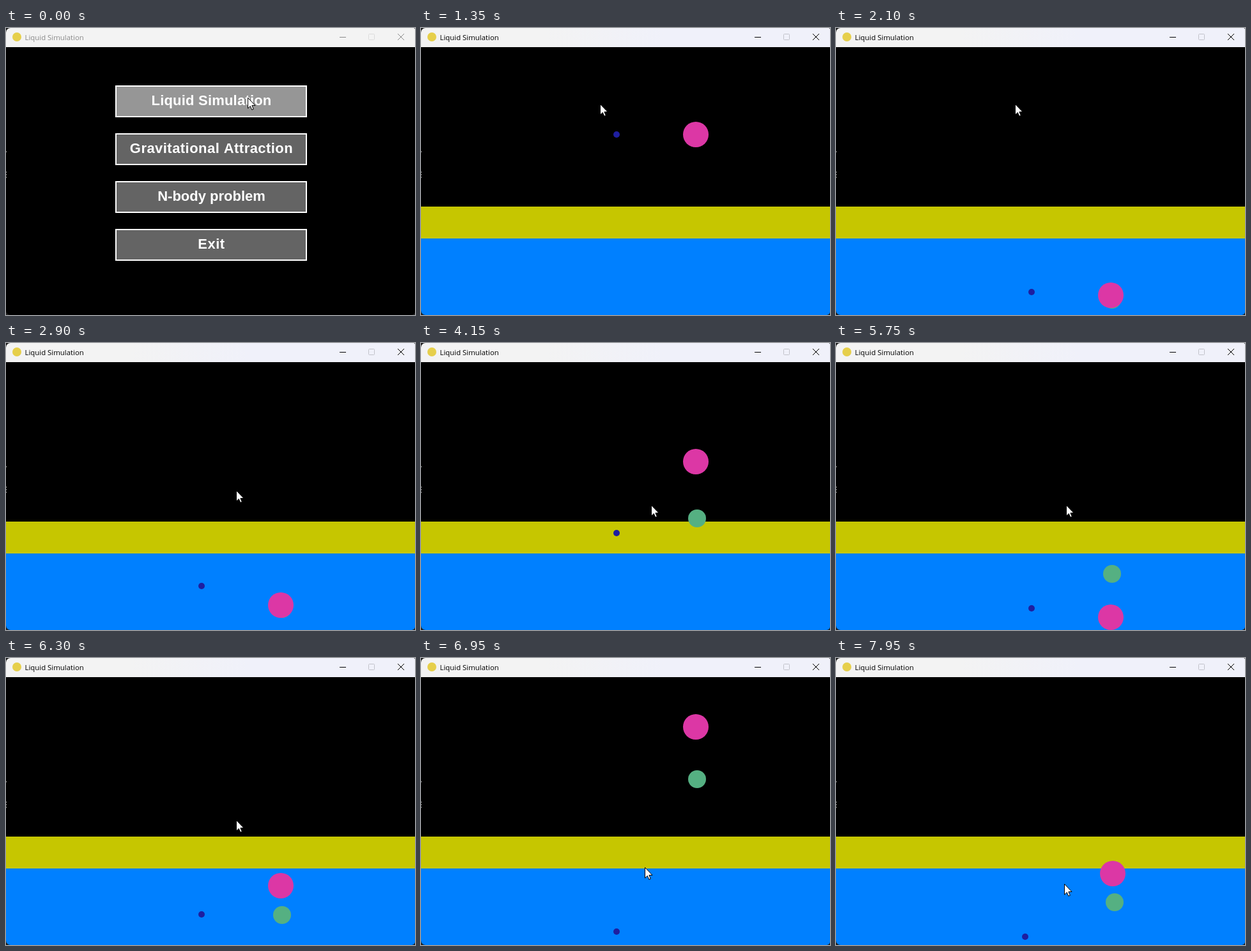
An HTML page with a canvas for the animation above (8 s loop, 640 by 450 pixels).

```html
<!DOCTYPE html>
<html lang="en">
<head>
<meta charset="utf-8">
<title>Liquid Simulation</title>
<style>
  html, body { margin: 0; width: 100%; height: 100%; overflow: hidden; background: #000; }
  canvas { display: block; }
</style>
</head>
<body>
<canvas id="stage" width="640" height="450"></canvas>
<script>
const ctx = document.getElementById('stage').getContext('2d');
const WIDTH = 640, HEIGHT = 450, SURFACE = 280, GRAVITY = 900;
const LOOP = 8, STEP = 0.05, FOCUS = 0.8, START = 1.05, KICK = 7.7, GLIDE = 0.3;

const buttons = [
  { label: 'Liquid Simulation', gap: 0.2 },
  { label: 'Gravitational Attraction', gap: 0.45 },
  { label: 'N-body problem', gap: 0 },
  { label: 'Exit', gap: 0.5 }
];

// A ball leaps through the air to each peak (time, height) and bobs in the liquid between.
const release = { t: 1.063, y: 130 };
const balls = [
  { x: 432, r: 14, color: '#55b082', bob: 45, kick: [4, -23],
    peaks: [release, { t: 4.885, y: 32 }, { t: 7.17, y: 168 }] },
  { x: 430, r: 20, color: '#dc37a5', bob: 45, kick: [3, -87],
    peaks: [release, { t: 4.765, y: 16 }, { t: 7.065, y: 102 }] },
  { x: 306, r: 5, color: '#1e1ea0', bob: 150, kick: [-10, 0],
    peaks: [release, { t: 4.645, y: 189 }] }
];

const pointerStops = [
  { t: 0, x: 378, y: 109 }, { t: 1.35, x: 280, y: 119 }, { t: 2.5, x: 360, y: 231 },
  { t: 3.6, x: 360, y: 254 }, { t: 6.7, x: 350, y: 328 }, { t: 7.6, x: 357, y: 354 }
];

const clamp = u => Math.max(0, Math.min(1, u));
const ease = u => u * u * (3 - 2 * u);
const fallTime = peak => Math.sqrt(2 * (SURFACE - peak.y) / GRAVITY);

function sunkDepth(ball, last, next, t) {
  const floor = HEIGHT - ball.r - SURFACE;
  const speed = GRAVITY * fallTime(last);
  const since = t - last.t - fallTime(last);
  const rest = Math.max(0, since - floor / speed);
  const force = (speed / (GRAVITY * fallTime(release))) ** 2;
  const lift = ball.bob * force * Math.exp(-0.9 * rest) * Math.abs(Math.sin(1.667 * rest));
  const rise = next ? GRAVITY * fallTime(next) * (next.t - fallTime(next) - t) : Infinity;
  return Math.min(speed * since, floor - lift, rise);
}

function ballHeight(ball, t) {
  const flight = ball.peaks.find(p => Math.abs(t - p.t) <= fallTime(p));
  if (flight) return flight.y + GRAVITY / 2 * (t - flight.t) ** 2;
  const i = ball.peaks.findLastIndex(p => p.t < t);
  return SURFACE + sunkDepth(ball, ball.peaks[i], ball.peaks[i + 1], t);
}

function pointerAt(t) {
  let { x, y } = pointerStops[0];
  for (const stop of pointerStops.slice(1)) {
    const u = ease(clamp((t - stop.t) / GLIDE + 1));
    x += (stop.x - x) * u;
    y += (stop.y - y) * u;
  }
  return [Math.round(x), Math.round(y)];
}

function rect(color, x, y, w, h) {
  ctx.fillStyle = color;
  ctx.fillRect(x, y, w, h);
}

function disc(color, x, y, r) {
  ctx.fillStyle = color;
  ctx.beginPath();
  ctx.arc(x, y, r, 0, Math.PI * 2);
  ctx.fill();
}

function drawMenu() {
  ctx.font = 'bold 22px "Liberation Sans", Arial, sans-serif';
  ctx.textAlign = 'center';
  buttons.forEach((b, i) => {
    const y = 90 + 75 * i;
    rect('#fff', 171, y, 300, 50);
    rect(i ? '#646464' : '#969696', 173, y + 2, 296, 46);
    ctx.letterSpacing = b.gap + 'px';
    ctx.fillStyle = '#fff';
    ctx.fillText(b.label, 321.5, y + 31);
  });
  ctx.letterSpacing = '0px';
}

function drawTank(t) {
  rect('#c6c600', 0, SURFACE, WIDTH, 50);
  rect('#0080ff', 0, SURFACE + 50, WIDTH, 120);
  const push = clamp((t - KICK) / 0.25);
  for (const b of balls) {
    const x = b.x + b.kick[0] * push;
    const y = ballHeight(b, Math.max(t, release.t)) + b.kick[1] * push;
    disc(b.color, Math.round(x), Math.round(y), b.r);
  }
}

function drawTitleBar(active) {
  const fill = ctx.createLinearGradient(0, 0, WIDTH, 0);
  fill.addColorStop(0.3, '#f3f3f3');
  fill.addColorStop(0.6, active ? '#f0f1fa' : '#f3f3f3');
  rect(fill, 0, 0, WIDTH, 30);
  disc('#e6cf4a', 17, 14, 7);

  const ink = active ? '#000' : '#8a8a8a';
  ctx.font = '11.4px "Open Sans", "Noto Sans", sans-serif';
  ctx.textAlign = 'left';
  ctx.fillStyle = ink;
  ctx.fillText('Liquid Simulation', 29.5, 19);

  rect(ink, 522, 14, 10, 1);
  ctx.lineWidth = 1;
  ctx.strokeStyle = active ? '#c2c3ca' : '#dcdcdc';
  ctx.beginPath();
  ctx.roundRect(567.5, 9.5, 9, 9, 1);
  ctx.stroke();
  ctx.strokeStyle = ink;
  ctx.beginPath();
  ctx.moveTo(613, 9);
  ctx.lineTo(623, 19);
  ctx.moveTo(623, 9);
  ctx.lineTo(613, 19);
  ctx.stroke();
}

function drawPointer(x, y) {
  ctx.save();
  ctx.translate(x + 0.5, y + 0.5);
  const arrow = new Path2D('M0 0V16.5L3.8 13L6.3 18.8L8.8 17.7L6.4 12H11.5Z');
  ctx.fillStyle = '#fff';
  ctx.fill(arrow);
  ctx.strokeStyle = '#000';
  ctx.lineWidth = 1;
  ctx.stroke(arrow);
  ctx.restore();
}

function draw(t) {
  rect('#202020', 0, 0, WIDTH, HEIGHT);
  ctx.save();
  ctx.beginPath();
  ctx.roundRect(0, 0, WIDTH, HEIGHT, [7, 2, 5, 7]);
  ctx.clip();
  rect('#000', 0, 0, WIDTH, HEIGHT);
  if (t < START) drawMenu();
  else drawTank(t);
  drawTitleBar(t >= FOCUS);
  ctx.restore();

  // Specks of the desktop at the window's left edge.
  rect('#8c8c8c', 0, 193, 1, 2);
  for (let y = 225; y < 237; y += 4) rect('#8c8c8c', 0, y, 1, 2);
  drawPointer(...pointerAt(t));
}

const begin = performance.now();
function tick() {
  const t = Math.max(0, performance.now() - begin) / 1000 % LOOP;
  draw(Math.floor((t + 0.001) / STEP) * STEP % LOOP);
  requestAnimationFrame(tick);
}
tick();
</script>
</body>
</html>
```
